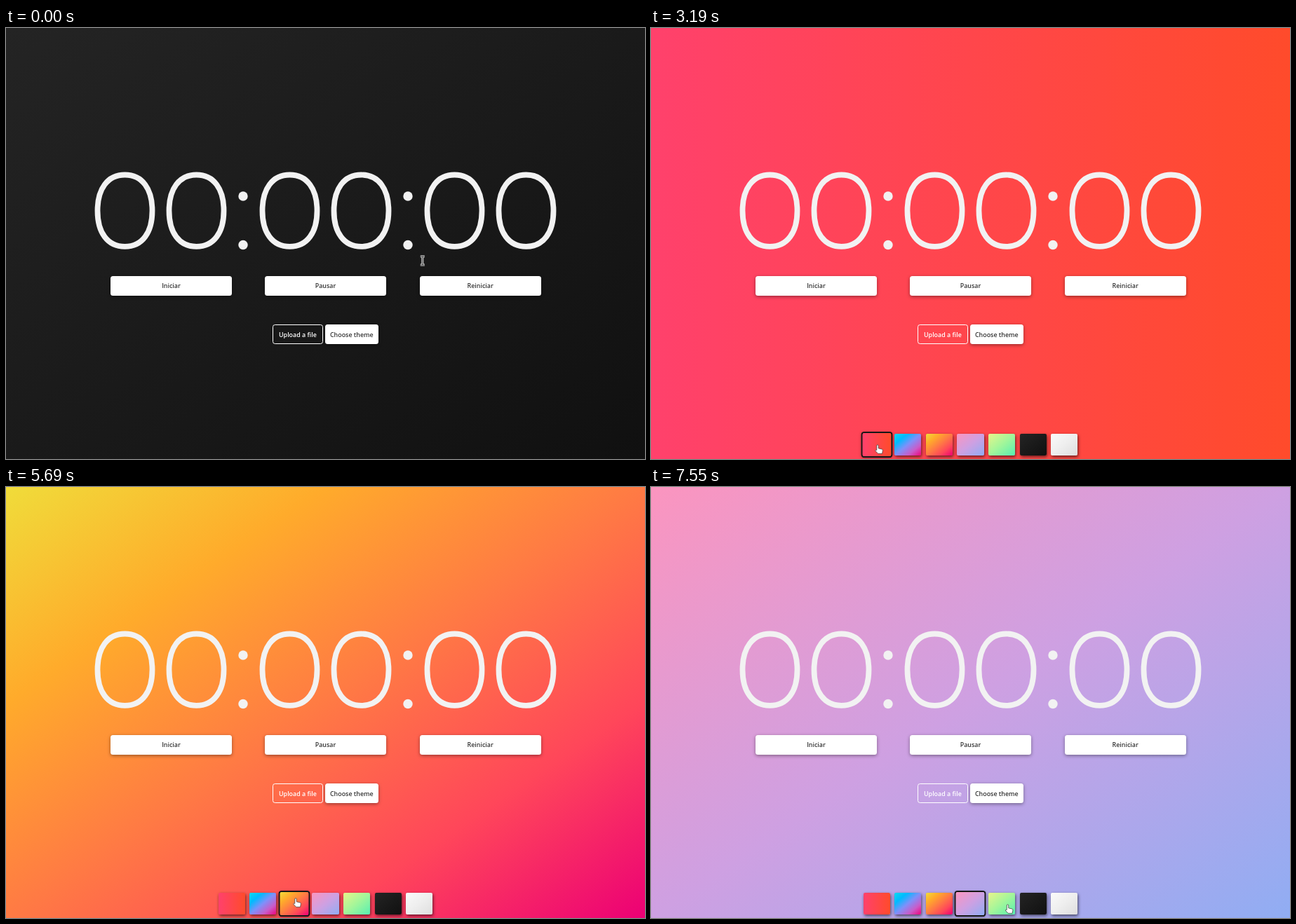
An HTML page for the animation above (8000 ms loop, 911 by 615 pixels).

```html
<!DOCTYPE html>
<html lang="es">
<head>
<meta charset="utf-8">
<title>Timer themes</title>
<style>
  html, body { margin: 0; width: 100%; height: 100%; overflow: hidden; }
  #stage { position: relative; width: 911px; height: 615px; overflow: hidden; }
  #stage svg { position: absolute; left: 0; top: 0; }
  .button {
    position: absolute; box-sizing: border-box; height: 28px;
    display: flex; align-items: center; justify-content: center;
    font: 600 8.89px "Open Sans", "Noto Sans", sans-serif; white-space: nowrap;
    color: #333; background: #fff; border-radius: 3.5px;
    box-shadow: 0 1.5px 5px rgba(0, 0, 0, .4);
  }
  .button.hover { color: #1d4f9f; background: #f8fbff; }
  .button.outline { color: #fff; background: none; border: 1.4px solid #fff; box-shadow: none; }
  .swatch {
    position: absolute; top: 578.5px; width: 38.4px; height: 31px; border-radius: 2px;
    box-shadow: 1px 2px 4px rgba(0, 0, 0, .6);
  }
  .swatch.selected { transform: scale(1.07); box-shadow: 0 0 0 1.9px #171717, 0 1px 4px 1px rgba(0, 0, 0, .5); }
</style>
</head>
<body>
<div id="stage">
  <svg id="clock" width="911" height="615" role="img" aria-label="00:00:00"></svg>
  <div id="buttons"></div>
  <div id="panel"></div>
  <svg width="911" height="615">
    <g id="cursor">
      <g data-kind="beam" fill="none">
        <path id="beam" d="M-3-6H3M-3 6H3M0-6V6" stroke="#e4e4e4" stroke-width="3"/>
        <path d="M-3-6H3M-3 6H3M0-6V6" stroke="#252525" stroke-width="1"/>
      </g>
      <path data-kind="hand" fill="#fff" stroke="#333" stroke-width=".7" stroke-linejoin="round"
        d="M-1.2 6.5V1a1.2 1.2 0 0 1 2.4 0V4.8L6.3 6q1.3.4 1.1 1.8L6.6 12.3H.6L-3.4 8q.8-1.6 2.2-.6z"/>
      <path data-kind="arrow" fill="#fff" stroke="#222" stroke-width=".7" d="M0 0V11L2.6 8.6 4.3 12.3 6 11.5 4.3 7.9H7.8z"/>
    </g>
  </svg>
</div>
<script>
const LOOP = 8000;
const PANEL_OPEN = 1790;
const $ = id => document.getElementById(id);
const diagonal = colors => `linear-gradient(to bottom right, ${colors})`;

const themes = [
  'linear-gradient(to right, #ff416c, #ff4b2b)',
  diagonal('#08daf0, #00bbff, #7f90fa, #c95cc9, #f0047b'),
  diagonal('#f0dc3a, #ffab2b, #ff7a44, #ff465a, #ec0075'),
  diagonal('#fb95bf, #cea0e2, #90adf3'),
  diagonal('#e8f58a, #a2f69a, #56efb2'),
  diagonal('#242424, #1a1a1a, #101010'),
  diagonal('#fafafa, #eeeeee, #dedede')
];
// [start time, theme]
const themeSteps = [[0, 5], [3190, 0], [4480, 1], [5690, 2], [6990, 3]];

// [time, x, y] of the cursor hot spot
const path = [
  [0, 594, 332], [870, 413, 403], [1030, 394, 418], [1350, 468.5, 449],
  [1670, 471, 447], [1750, 471, 447], [2630, 326, 597], [2870, 323, 595],
  [3680, 323, 595], [3980, 344, 554], [4320, 374, 597], [4560, 374, 597],
  [4640, 373, 598], [4800, 373, 598], [5200, 413, 587], [5850, 413, 587],
  [6250, 444, 587], [6990, 444, 587], [7550, 508.5, 596], [LOOP, 508.5, 596]
];

const zero = x => `<path transform="translate(${x} 260.7)" fill="none" stroke="#f2f2f2" stroke-width="7.8"
  d="M0-51.2C25-51.2 39-31 39 0S25 51.2 0 51.2-39 31-39 0-25-51.2 0-51.2z"/>`;
const colon = x => [240, 309.5].map(y => `<circle cx="${x}" cy="${y}" r="6.7" fill="#f2f2f2"/>`).join('');
$('clock').innerHTML =
  [169.5, 271.5, 404.5, 506.5, 639.5, 741.5].map(zero).join('') + [338, 573].map(colon).join('');

function box(parent, className, x, y, w, h, text = '') {
  const el = document.createElement('div');
  el.className = className;
  el.textContent = text;
  el.style.left = x + 'px';
  if (text) Object.assign(el.style, { top: y + 'px', width: w + 'px' });
  $(parent).append(el);
  return { el, contains: (px, py) => px >= x && px <= x + w && py >= y && py <= y + h };
}

const buttons = [
  box('buttons', 'button', 149, 353.8, 173, 28, 'Iniciar'),
  box('buttons', 'button', 369, 353.8, 173, 28, 'Pausar'),
  box('buttons', 'button', 589.7, 353.8, 173, 28, 'Reiniciar'),
  box('buttons', 'button', 454.7, 423, 76.3, 28, 'Choose theme'),
  box('buttons', 'button outline', 379.8, 423, 72.2, 28, 'Upload a file')
];
const swatches = themes.map((background, i) => {
  const swatch = box('panel', 'swatch', 302.5 + 44.6 * i, 578.5, 38.4, 31);
  swatch.el.style.background = background;
  return swatch;
});
const shapes = [...$('cursor').children];

function cursorAt(t) {
  const i = path.findIndex(key => key[0] > t);
  const [t0, x0, y0] = path[i - 1], [t1, x1, y1] = path[i];
  const p = (t - t0) / (t1 - t0);
  return [x0 + (x1 - x0) * p, y0 + (y1 - y0) * p];
}

function draw(t) {
  const [x, y] = cursorAt(t);
  const theme = themeSteps.filter(step => step[0] <= t).pop()[1];
  const open = Math.min(1, Math.max(0, (t - PANEL_OPEN) / 300));
  const overButton = buttons.find(b => b.contains(x, y));
  const overSwatch = open === 1 && swatches.some(s => s.contains(x, y));
  const kind = overButton || overSwatch ? 'hand' : y < 345 ? 'beam' : 'arrow';

  $('stage').style.background = themes[theme];
  swatches.forEach((s, i) => s.el.classList.toggle('selected', i === theme));
  buttons.forEach(b => b.el.classList.toggle('hover', b === overButton && !b.el.matches('.outline')));
  $('panel').style.opacity = open ? 1 : 0;
  $('panel').style.transform = `translateY(${40 * (1 - open) ** 2}px)`;
  shapes.forEach(s => s.style.display = s.dataset.kind === kind ? '' : 'none');
  $('cursor').setAttribute('transform', `translate(${x} ${y})`);
}

const start = performance.now();
function tick() {
  draw((performance.now() - start) % LOOP);
  requestAnimationFrame(tick);
}
tick();
</script>
</body>
</html>
```
